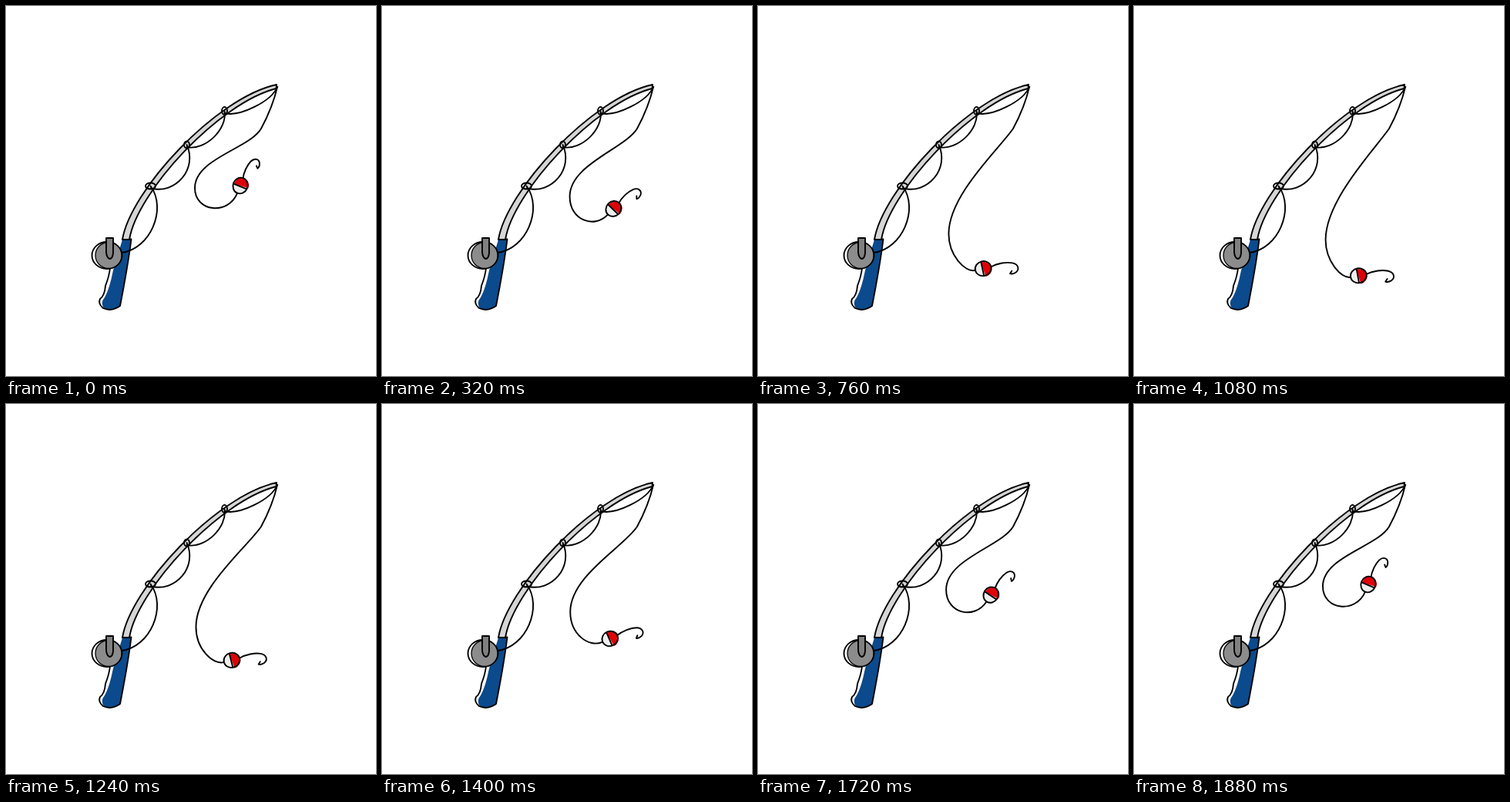
An HTML page that plays this animation: 480x480 px, repeating every 1.92 s.

```html
<!DOCTYPE html>
<html lang="en">
<head>
<meta charset="utf-8">
<title>Fishing rod</title>
<style>
  html, body { margin: 0; width: 100%; height: 100%; overflow: hidden; background: #fff; }
  svg { display: block; width: 100vw; height: 100vh; }
  .ink { fill: none; stroke: #000; stroke-width: 1.9; stroke-linecap: round; stroke-linejoin: round; }
  #hook { vector-effect: non-scaling-stroke; }
</style>
</head>
<body>
<svg viewBox="0 0 480 480">
  <!-- handle -->
  <path fill="#0b4a8c" d="M151 303 H162 Q157 340 148 390 Q138 396 127 392 Q122 385 128 378 Q134 368 139 343 Z"/>
  <path class="ink" d="M151 303 L162.500 302.500 Q158 338 148 389 Q137 397 126 392 Q119 386 122 380 Q128 376 129 363 Q134 350 135 340"/>
  <!-- rod -->
  <path class="ink" style="fill:#d6d6d6" d="M151 303 C161 240 272 119 351 102 L350.500 107 C276 126 170 241 160 303 Z"/>
  <g id="guides"></g>
  <!-- reel -->
  <ellipse class="ink" style="fill:#fff" cx="131" cy="323.500" rx="19.500" ry="17.500"/>
  <circle class="ink" style="fill:#8c8c8c;stroke-width:1.3" cx="133" cy="323.500" r="17"/>
  <path class="ink" style="fill:#808080" d="M130 301 H139 V321 Q138 328 134.500 328 Q131 327 130 320 Z"/>
  <!-- moving parts -->
  <path id="line" class="ink"/>
  <g id="float">
    <path id="hook" class="ink" d="M10 0 C20 -3 32 -2 39 1 C46 4 47 11 41 14 Q36 16 33 14 L36 11"/>
    <ellipse fill="#eee" rx="10.500" ry="9.500"/>
    <path fill="#e00008" d="M-1 -8.500 A10.500 9.500 0 0 1 1 11 Z"/>
    <ellipse class="ink" rx="10.500" ry="9.500"/>
    <path class="ink" d="M-1 -9 V9"/>
  </g>
</svg>
<script>
const LOOP = 1920, STEP = 40;
const el = id => document.getElementById(id);

// Slack line hanging from a to b, pulled sideways by sag
function slack(a, b, sag) {
  const dx = b.x - a.x, dy = b.y - a.y;
  const h = sag / 0.75 / Math.hypot(dx, dy);
  const ctrl = k => `${a.x + k * dx + h * dy} ${a.y + k * dy - h * dx}`;
  return `<path class="ink" d="M${a.x} ${a.y} C${ctrl(0.2)} ${ctrl(0.8)} ${b.x} ${b.y}"/>`;
}

const tip = { x: 352, y: 105 };
const reel = { x: 150, y: 317, sag: 24 };
const guides = [
  { x: 283.5, y: 136, rx: 3.5, ry: 5, sag: 10 },
  { x: 234.5, y: 180, rx: 3.5, ry: 4.5, sag: 15 },
  { x: 187.5, y: 233.5, rx: 6.5, ry: 4, sag: 23 }
];
const stops = [tip, ...guides, reel];
el("guides").innerHTML =
  guides.map(g => `<ellipse class="ink" cx="${g.x}" cy="${g.y}" rx="${g.rx}" ry="${g.ry}"/>`).join("") +
  stops.slice(1).map((b, i) => slack(stops[i], { x: b.x, y: b.y + 3 }, b.sag)).join("");

function draw(t) {
  // u is the drop of the float: 0 at the top, 1 at the bottom; the rise lags a little
  const w = 2 * Math.PI * t / LOOP;
  const u = (1 - Math.cos(w)) / 2 + 0.03 * Math.max(0, -Math.sin(w));
  const x = 304 - 15 * u + 2 * u * u, y = 233 + 120 * u;
  const deg = -68 + 98 * u - 40 * u * u;
  const cos = Math.cos(deg * Math.PI / 180), sin = Math.sin(deg * Math.PI / 180);

  // The line runs tip, bend, leftmost point of the belly, back of the float
  const bellyX = 245 - 9 * u + 13 * u * u, bellyY = 236 + 36 * u + 34 * u * u;
  const behind = d => `${x - d * cos} ${y - d * sin}`;
  el("line").setAttribute("d",
    `M${tip.x} ${tip.y} Q346 131 331 159` +
    `C${316 - 3 * u} 185 ${bellyX} ${bellyY - 38 - 14 * u} ${bellyX} ${bellyY}` +
    `C${bellyX} ${bellyY + 32 - 4 * u} ${behind(41 - 19 * u)} ${behind(11)}`);

  el("float").setAttribute("transform", `translate(${x} ${y}) rotate(${deg})`);
  el("hook").setAttribute("transform", `scale(${0.88 + 0.12 * u})`);
}

function tick() {
  draw(Math.floor(performance.now() % LOOP / STEP) * STEP);
  requestAnimationFrame(tick);
}
tick();
</script>
</body>
</html>
```
